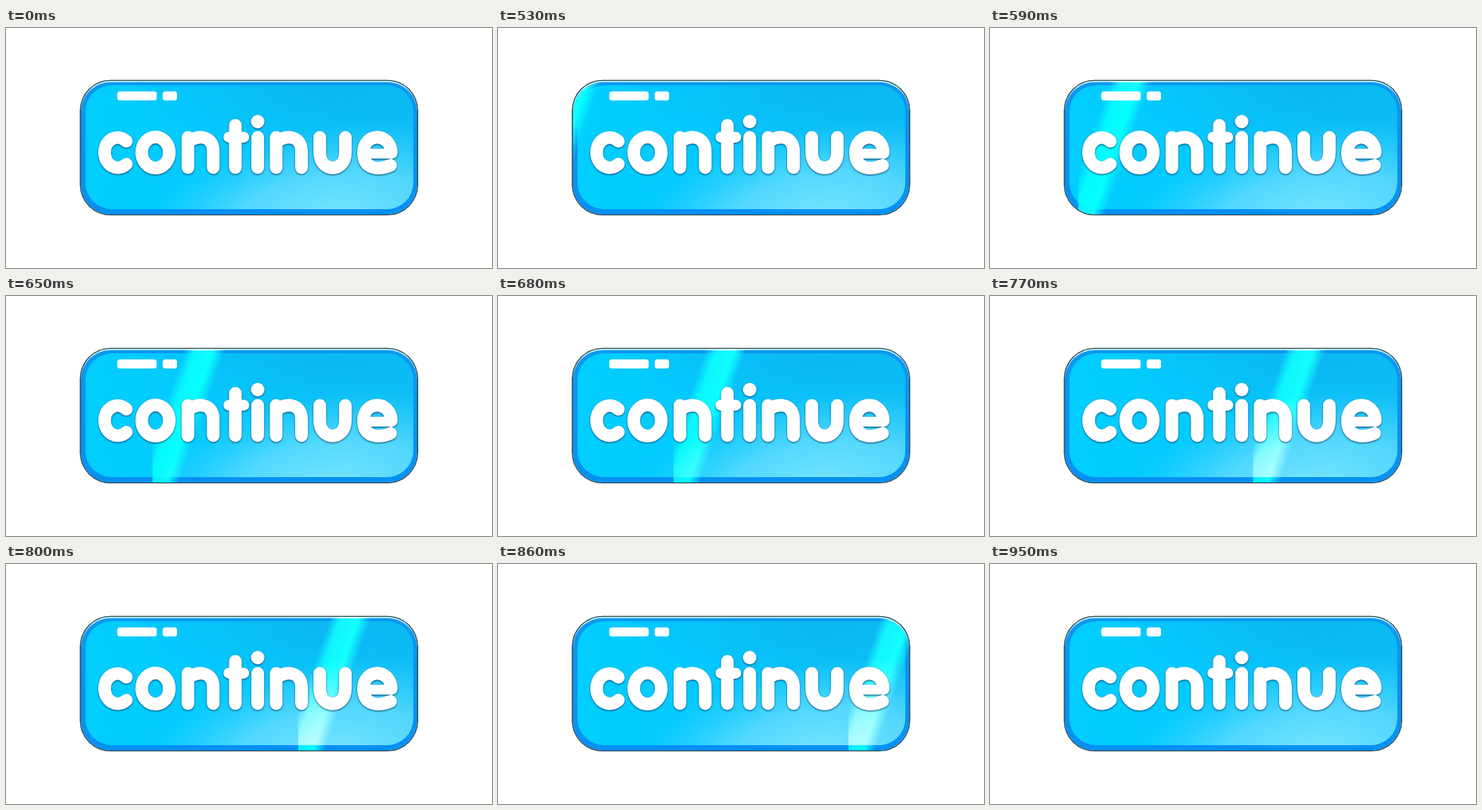
Recreate the animation shown at these times as an HTML page. Size 642x318 px, loop 1.45 s.

```html
<!DOCTYPE html>
<html lang="en">
<head>
<meta charset="utf-8">
<title>Continue button</title>
<style>
  html, body { margin: 0; width: 100%; height: 100%; overflow: hidden; background: #fff; }
  svg { display: block; width: 100vw; height: 100vh; }
  .dodge { mix-blend-mode: color-dodge; }
  .letters { fill: none; stroke: #fff; stroke-width: 16.8; stroke-linecap: round; stroke-linejoin: round; }
  .shadow { filter: drop-shadow(0 1.5px .8px rgba(0, 45, 90, .85)); }
</style>
</head>
<body>
<svg viewBox="0 0 642 318" role="img" aria-label="continue">
  <defs>
    <linearGradient id="face">
      <stop offset="0" stop-color="#02ceff"/>
      <stop offset=".35" stop-color="#04caff"/>
      <stop offset="1" stop-color="#0cc0f8"/>
    </linearGradient>
    <radialGradient id="dim" gradientUnits="userSpaceOnUse" cx="0" cy="0" r="1" gradientTransform="translate(430 85) scale(270 75)">
      <stop offset="0" stop-color="#0cb2ee" stop-opacity=".7"/>
      <stop offset="1" stop-color="#0cb2ee" stop-opacity="0"/>
    </radialGradient>
    <radialGradient id="glow" gradientUnits="userSpaceOnUse" cx="0" cy="0" r="1" gradientTransform="translate(425 255) rotate(-10) scale(250 125)">
      <stop offset="0" stop-color="#80e6ff" stop-opacity=".95"/>
      <stop offset=".5" stop-color="#70e0ff" stop-opacity=".72"/>
      <stop offset="1" stop-color="#50d6ff" stop-opacity="0"/>
    </radialGradient>
    <linearGradient id="rim" x2="0" y2="1">
      <stop offset="0" stop-color="#0c98f0"/>
      <stop offset="1" stop-color="#0590f2"/>
    </linearGradient>
    <linearGradient id="sheen">
      <stop offset="0" stop-color="#6c6c6c" stop-opacity="0"/>
      <stop offset=".25" stop-color="#6c6c6c" stop-opacity=".85"/>
      <stop offset=".7" stop-color="#6c6c6c"/>
      <stop offset="1" stop-color="#6c6c6c" stop-opacity="0"/>
    </linearGradient>
    <clipPath id="body"><rect x="99" y="71" width="444" height="176" rx="39"/></clipPath>
    <clipPath id="cut"><rect y="60" width="140" height="200"/></clipPath>
  </defs>

  <rect x="97.5" y="68.7" width="447" height="179.6" rx="40.5" fill="#2c4a58"/>
  <rect x="99" y="70" width="444" height="177" rx="39" fill="#c4f4ff"/>
  <rect x="99" y="71.7" width="444" height="175.3" rx="39" fill="url(#rim)"/>
  <g id="panel"></g>

  <g class="dodge" clip-path="url(#body)">
    <g id="shine" clip-path="url(#cut)">
      <rect x="42" y="-12" width="54" height="200" fill="url(#sheen)" transform="translate(0 72) skewX(-19.2)"/>
    </g>
  </g>

  <g fill="#fff">
    <rect x="147" y="84" width="52" height="12" rx="3.5"/>
    <rect x="207" y="84" width="19" height="12" rx="3.5"/>
  </g>
  <g class="shadow">
    <g class="letters">
      <path d="M159 150C147 139 130.3 148 130.3 165S147 191 159 180.5"/>
      <ellipse cx="197.5" cy="165" rx="18.2" ry="20.6"/>
      <path id="n" d="M240.3 185V145M240.3 152C250 141 273.8 141 273.8 163V185"/>
      <path d="M303 129V185"/>
      <path d="M294.5 144.7H314" stroke-width="14.5"/>
      <path d="M332.5 145V185"/>
      <use href="#n" x="116.6"/>
      <path d="M414.5 145V165C414.5 192 448.3 192 448.3 165V145"/>
      <path d="M509 165C508 138 472.3 138 472.3 165C472.3 187 491 189 508 182"/>
      <path d="M474 166.5H510" stroke-width="13"/>
    </g>
    <circle cx="332.5" cy="124" r="9" fill="#fff"/>
  </g>
</svg>
<script>
  const LOOP = 1450, START = 530, END = 950, STEP = 30;
  const FIRST_X = 39.5, STEP_X = 38.5;
  const panel = document.getElementById('panel');
  const shine = document.getElementById('shine');

  panel.innerHTML = ['face', 'dim', 'glow'].map(id =>
    `<rect x="105" y="76" width="433" height="164" rx="35" fill="url(#${id})"/>`).join('');

  function draw(time) {
    const t = time % LOOP;
    const visible = t >= START && t < END;
    const x = FIRST_X + STEP_X * Math.floor((t - START) / STEP);
    shine.setAttribute('visibility', visible ? 'visible' : 'hidden');
    shine.setAttribute('transform', `translate(${x})`);
  }

  let origin;
  function tick(now) {
    origin ??= now;
    draw(now - origin);
    requestAnimationFrame(tick);
  }
  draw(0);
  requestAnimationFrame(tick);
</script>
</body>
</html>
```
